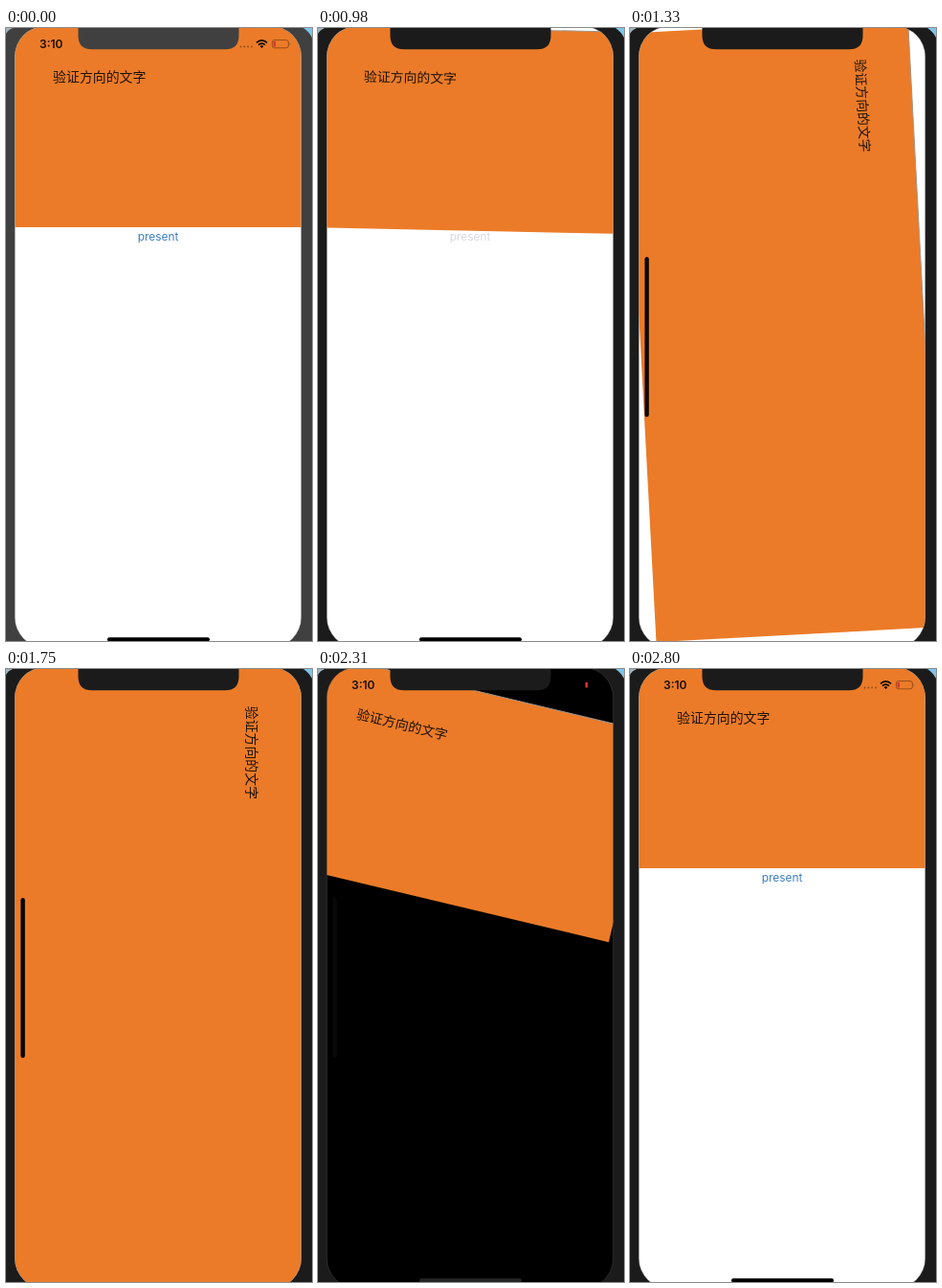
Animation, 320 px wide and 640 px high, one loop 2870 ms. Source, as an HTML page:

```html
<!DOCTYPE html>
<html lang="zh">
<head>
<meta charset="utf-8">
<title>Rotation transition</title>
<style>
html, body { margin: 0; width: 100%; height: 100%; overflow: hidden; background: #1b1b1b; }
svg { display: block; width: 100vw; height: 100vh; }
.ui { font-family: Inter, Roboto, sans-serif; }
.cjk { font-family: "Noto Sans CJK SC", "Noto Sans CJK", sans-serif; }
</style>
</head>
<body>
<svg viewBox="0 0 320 640">
  <defs>
    <clipPath id="screen"><rect x="9.3" y="-1.5" width="299.4" height="648" rx="31"/></clipPath>
  </defs>
  <rect class="bezel" width="320" height="640"/>
  <path d="M0 0H7Q2 2 0 6Z" fill="#9fb3bd"/>
  <path d="M311 0H320V10Q317 4 311 0Z" fill="#7cc4e8"/>
  <g clip-path="url(#screen)">
    <rect id="back" x="9" y="-2" width="300" height="650"/>
    <text id="button" class="ui" x="159" y="222" font-size="11.9" text-anchor="middle">present</text>
    <g id="card">
      <rect id="panel" fill="#eb7b28"/>
      <line id="rim" stroke="#a0958c"/>
      <text class="cjk" x="39.8" y="57.2" font-size="13.9" fill="#1d120a">验证方向的文字</text>
    </g>
    <g id="status">
      <text class="ui" x="35" y="21.2" font-size="12" font-weight="600" fill="#1a0e06">3:10</text>
      <path d="M245.5 19.5h14" stroke="#000" stroke-opacity=".35" stroke-width="2" stroke-linecap="round" stroke-dasharray="0 3.8"/>
      <g fill="none" stroke="#000" stroke-width="1.7">
        <path d="M262 15.3Q267.5 10.6 273 15.3"/>
        <path d="M264 17.7Q267.5 14.7 271 17.7"/>
      </g>
      <path d="M265.6 18.9Q267.5 17.4 269.4 18.9L267.5 20.9Z"/>
      <g opacity=".4">
        <rect x="278.4" y="12.6" width="17" height="8.2" rx="2.4" fill="none" stroke="#000" stroke-width=".9"/>
        <path d="M296.6 15.2q1.4 1.5 0 3Z"/>
      </g>
      <rect x="279.6" y="13.8" width="2.4" height="5.8" rx=".7" fill="#d9362a"/>
    </g>
    <rect id="barBottom" x="106" y="636.2" width="107" height="4" rx="2"/>
    <rect id="barSide" x="15.4" y="239" width="4.4" height="167" rx="2.2"/>
  </g>
  <rect x="9.3" y="-1.5" width="299.4" height="648" rx="31" fill="none" stroke="#777" stroke-opacity=".35" stroke-width=".8"/>
  <path class="bezel" d="M75.5 -2V8Q75.5 22.3 90 22.3H229Q243.5 22.3 243.5 8V-2Z"/>
</svg>
<script>
const LOOP = 2870, STEP = 70;
const ACTIVE = 630, PRESS = 840, HIDE = 940, DISMISS = 2100, DONE = 2470;
const $ = id => document.getElementById(id);
const set = (el, attrs) => { for (const k in attrs) el.setAttribute(k, attrs[k]); };
const clamp = v => Math.max(0, Math.min(1, v));
const mix = (a, b, p) => a + (b - a) * p;
const bezels = document.querySelectorAll('.bezel');

// cubic-bezier(.42, 0, .58, 1)
function easeInOut(x) {
  if (x <= 0 || x >= 1) return clamp(x);
  let lo = 0, hi = 1, s = .5;
  for (let i = 0; i < 24; i++) {
    s = (lo + hi) / 2;
    const bx = 1.26 * s * (1 - s) ** 2 + 1.74 * s * s * (1 - s) + s ** 3;
    if (bx < x) lo = s; else hi = s;
  }
  return s * s * (3 - 2 * s);
}

function turn(t) {
  if (t < DISMISS) return easeInOut((t - 943) / 445);
  return 1 - easeInOut((t - 1906) / 552);
}

function draw(t) {
  const p = turn(t);
  const dark = t >= DISMISS && t < DONE;
  const w = mix(299.4, 648, p), h = mix(209.5, 300.4, p);
  const cy = mix(103.25, 323, p);

  set($('card'), { transform: `translate(159 ${cy}) rotate(${90 * p}) translate(${-w / 2} ${-h / 2})` });
  set($('panel'), { width: w, height: h });
  set($('rim'), { x2: w, opacity: p > 0 ? 1 : 0 });

  bezels.forEach(b => set(b, { fill: t < ACTIVE ? '#404040' : '#1b1b1b' }));
  set($('back'), { fill: dark ? '#000' : '#fff' });
  set($('button'), {
    fill: t >= PRESS && t < DONE ? '#d9dade' : '#3c7fc1',
    opacity: dark ? 0 : 1
  });
  set($('status'), { opacity: t >= HIDE && t < DISMISS ? 0 : 1 });

  const bar = dark ? '#3a3a3a' : '#000';
  set($('barBottom'), { fill: bar, opacity: t < 1000 ? 1 : clamp(1 - p / .4) });
  set($('barSide'), { fill: bar, opacity: dark ? p : clamp((p - .4) / .6) });
}

const start = performance.now();
function tick() {
  const t = (performance.now() - start) % LOOP;
  draw(Math.floor(t / STEP) * STEP);
  requestAnimationFrame(tick);
}
tick();
</script>
</body>
</html>
```
